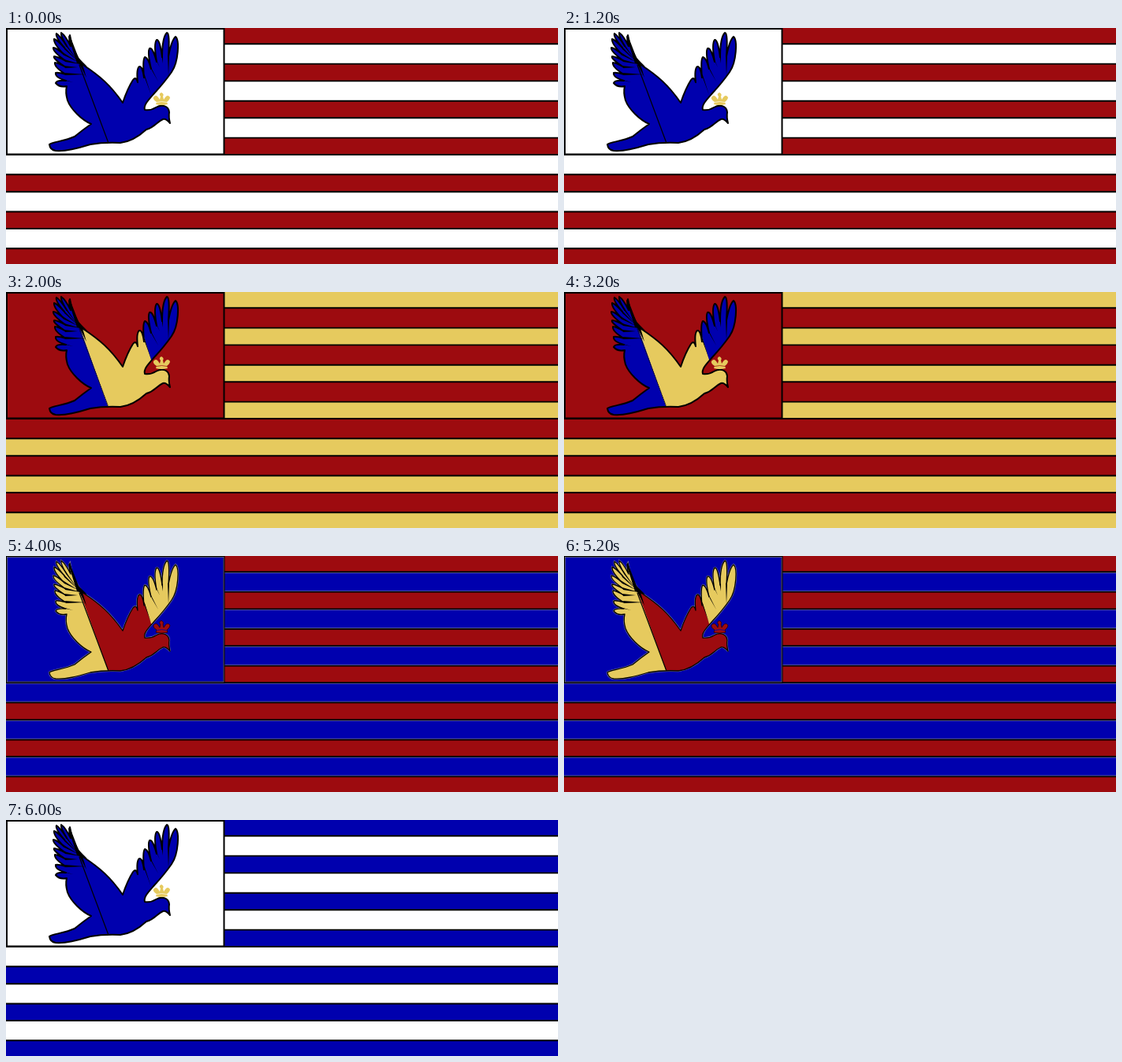
Write an HTML page that moves like this. It is 700 px wide and 300 px high and loops after 8000 ms.

```html
<!DOCTYPE html>
<html lang="en">
<head>
<meta charset="utf-8">
<title>Striped flag with bird</title>
<style>
  html, body { margin: 0; width: 100%; height: 100%; overflow: hidden; }
  svg { display: block; width: 100vw; height: 100vh; }
  .ink { fill: none; stroke: #000; stroke-linejoin: round; stroke-linecap: round; }
  .edge { fill: none; stroke: var(--edge); stroke-width: .7; }
</style>
</head>
<body>
<svg viewBox="0 0 700 300" preserveAspectRatio="none">
  <defs>
    <path id="bird" d="M55 148 C58 145 74 144 87 138 Q98 129 108 122
      C96 117 82 103 78 92 Q75 82 77 74
      Q68 76 63 70 Q64 66 76 67 Q62 63 63 57 Q66 56 76 59
      Q61 50 62 44 Q66 44 76 50 Q59 39 61 36 Q65 36 76 42
      Q59 30 60 25 Q64 25 74 34 Q60 20 61 14 Q65 15 74 25
      Q62 11 64 7 Q69 10 77 23 Q69 10 70 6 Q75 9 82 23
      Q79 12 81 9 C83 24 89 37 98 47
      C119 61 132 72 148 95 Q154 77 161 66 Q165 61 167 69
      Q165 52 169 49 Q173 48 175 63
      Q173 40 176 37 Q180 37 184 52
      Q179 30 182 26 Q186 24 191 43
      Q187 20 191 15 Q195 14 198 37
      Q198 12 204 6 Q208 6 206 36
      Q210 15 215 11 C220 15 219 43 210 56
      Q201 69 188 83 C181 91 174 98 176 104
      Q184 105 190 101 C197 97 206 98 207 107
      Q206 113 208 121 Q203 115 199 116
      C190 120 189 126 178 129 C166 140 155 145 145 146
      Q124 145 107 148 C90 153 76 157 63 156 Q56 155 55 148Z"/>
    <clipPath id="bodyClip">
      <path d="M91 38 130 147V170H230V98L184 86 172 48V30H91Z"/>
    </clipPath>
  </defs>

  <rect width="700" height="300" fill="var(--b)"/>
  <g id="stripes"></g>
  <rect x="1" y="1" width="275.5" height="159.5" fill="var(--canton)" stroke="#000" stroke-width="2"/>
  <rect x="1.5" y="1.5" width="274.5" height="158.5" class="edge"/>

  <use href="#bird" class="edge" style="stroke-width:calc(var(--line) + 1px)"/>
  <use href="#bird" fill="var(--wing)"/>
  <use href="#bird" fill="var(--body)" clip-path="url(#bodyClip)"/>
  <path class="ink" d="M93 47 129.5 145" style="stroke-width:var(--split);stroke-dasharray:var(--dash)"/>
  <use href="#bird" class="ink" style="stroke-width:var(--line)"/>

  <!-- dark slits between the feathers -->
  <path d="M79 10 82 12 92 38 103 49 90 45ZM76 67 85 69 75 66ZM75 57 100 59 76 60
    ZM74 48 91 50 75 51ZM74 40 95 46 75 43ZM72 31 91 43 74 35ZM72 22 91 42 74 27
    ZM74 17 91 42 77 24ZM90 40 97 46 102 63Z"/>
  <path d="M174 58 184 85 176 60ZM183 48 193 68 185 54ZM190 38 195 50 192 44
    ZM205 34 206 61 207 36ZM197 33 199 45 199 36Z"/>

  <g fill="var(--crown)" stroke="var(--rim)" stroke-width=".8">
    <path d="M190 97 191 94Q186 91 187 88 190 84 193 88L195 91 196 87
      Q193 84 197 82 201 84 199 87L200 91 202 88Q205 84 208 88 208 91 204 94L205 97Q197 99 190 97Z"/>
  </g>
  <path d="M191 94.5Q197.500 92.500 204 94.500" fill="none" stroke="var(--canton)" stroke-width=".7"/>
</svg>
<script>
const RED = '#9d0b0f', BLUE = '#0000ae', GOLD = '#e6ca5e', WHITE = '#fff', NONE = 'transparent';
const STEP = 2000;
const base = { line: '2px', split: '1.2px', dash: 'none', edge: NONE, rim: NONE, crown: GOLD };
const plain = { ...base, b: WHITE, canton: WHITE, wing: BLUE, body: BLUE };
const looks = [
  { ...plain, a: RED },
  { ...base, a: GOLD, b: RED, canton: RED, wing: BLUE, body: GOLD, split: '.9px', dash: '1 1.5' },
  { ...base, a: RED, b: BLUE, canton: BLUE, wing: GOLD, body: RED, crown: RED,
    line: '1.3px', edge: '#7777a0', rim: '#300' },
  { ...plain, a: BLUE }
];

const cuts = [20.3, 45.6, 67.4, 92.7, 114.3, 139.6, 161, 186.3, 208.2, 233.5, 255, 280.3];
const bounds = [0, ...cuts, 300];
let art = '';
for (let i = 0; i < bounds.length - 1; i += 2)
  art += `<rect y="${bounds[i]}" width="700" height="${bounds[i + 1] - bounds[i]}" fill="var(--a)"/>`;
cuts.forEach((y, i) => {
  const e = y + (i % 2 ? -1.2 : 1.2);
  art += `<path d="M0 ${y}H700" stroke="#000" stroke-width="1.9"/><path d="M0 ${e}H700" class="edge"/>`;
});
document.getElementById('stripes').innerHTML = art;

const style = document.documentElement.style;
let shown = -1;
function draw() {
  const i = Math.floor(performance.now() / STEP) % looks.length;
  if (i !== shown) {
    for (const key in looks[i]) style.setProperty('--' + key, looks[i][key]);
    shown = i;
  }
  requestAnimationFrame(draw);
}
draw();
</script>
</body>
</html>
```
